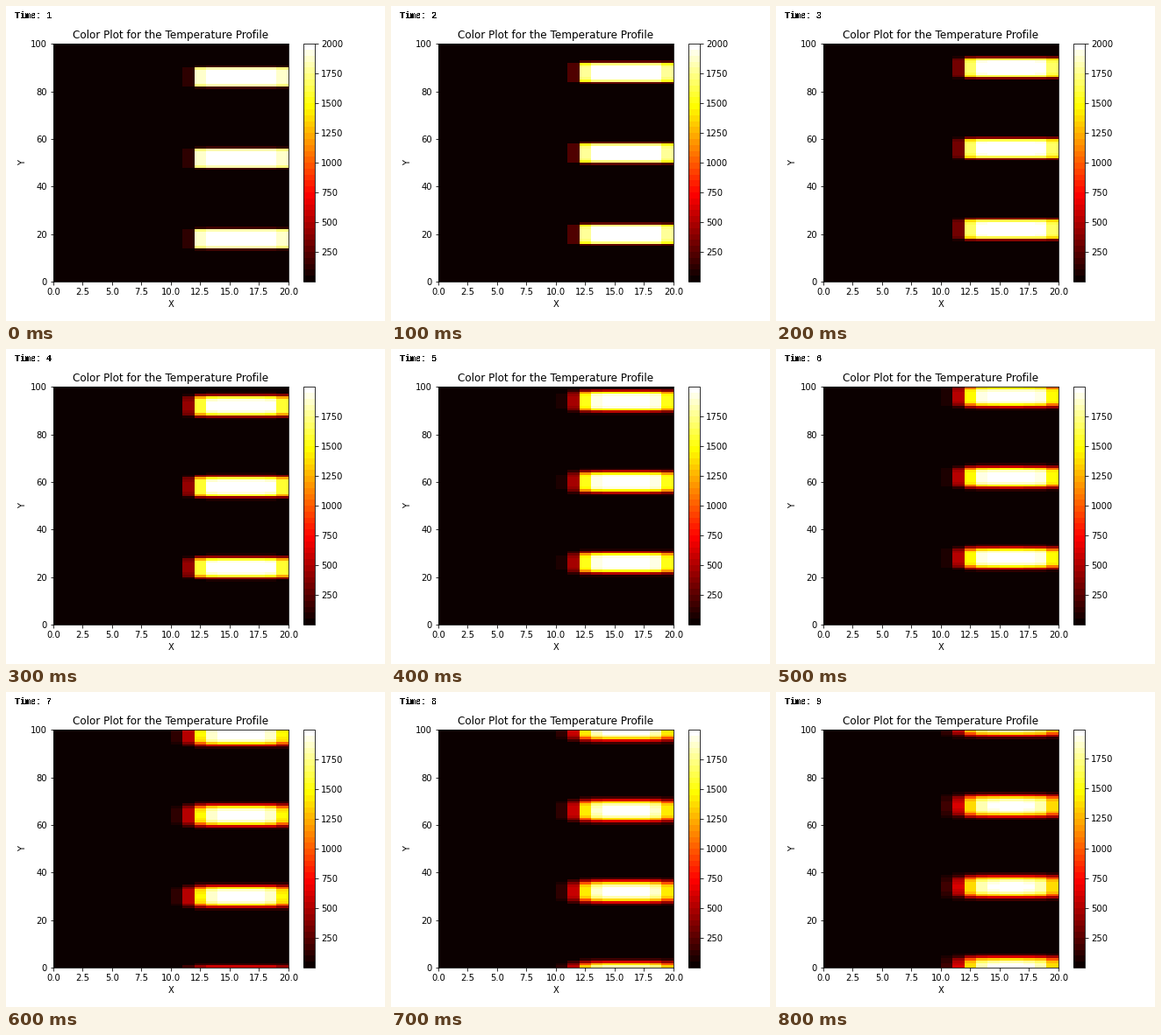
A matplotlib script that plays this animation: 432 px wide and 360 px high, repeating every 0.9 s.

```python
import numpy as np
import matplotlib.pyplot as plt
from matplotlib.animation import FuncAnimation

STEPS = 9          # one simulated time unit per frame
INTERVAL = 100     # ms
NX, NY = 20, 100
HOT = 2000.0
PERIOD, WIDTH = 34, 8
RX, RY = 0.068, 0.08   # diffusion numbers along x and y
SPEED = 2              # cells travelled upwards per step

plt.rcParams.update({"font.family": "DejaVu Sans", "font.size": 10})


def diffuse(values, rate, steps):
    """Explicit diffusion on a periodic line."""
    for _ in range(steps):
        values = values + rate * (np.roll(values, 1) - 2 * values
                                  + np.roll(values, -1))
    return values


def temperature(time):
    # Separable field: a bar profile in x times a moving stripe train in y.
    x = np.arange(-20, 52)
    bar = diffuse(((x >= 12) & (x < 20)).astype(float), RX, time)[20:20 + NX]
    y = np.arange(PERIOD)
    stripe = diffuse((y < WIDTH).astype(float), RY, time)
    rows = (np.arange(NY) - 12 - SPEED * time) % PERIOD
    return HOT * np.outer(stripe[rows], bar)


fig, ax = plt.subplots(figsize=(6, 5), dpi=72, facecolor="white")
fig.subplots_adjust(left=0.125, right=0.9, bottom=0.125, top=0.88)
mesh = ax.pcolormesh(np.arange(NX + 1), np.arange(NY + 1), temperature(1),
                     cmap=plt.get_cmap("hot", 40), vmin=0, vmax=HOT)
bar = fig.colorbar(mesh, ax=ax)
ax.set_title("Color Plot for the Temperature Profile")
ax.set_xlabel("X")
ax.set_ylabel("Y")
clock = fig.text(10 / 432, 1 - 14 / 360, "", family="Liberation Mono",
                 weight="bold", size=10, va="baseline", antialiased=False)


def draw(frame):
    time = frame + 1
    field = temperature(time)
    peak = field.max()
    mesh.set_array(field)
    mesh.set_clim(0, peak)
    bar.set_ticks(np.arange(250, peak + 1e-6, 250))
    clock.set_text(f"Time: {time}")
    return mesh, clock


anim = FuncAnimation(fig, draw, frames=STEPS, interval=INTERVAL,
                     repeat=True, repeat_delay=0, blit=False)
plt.show()
```
